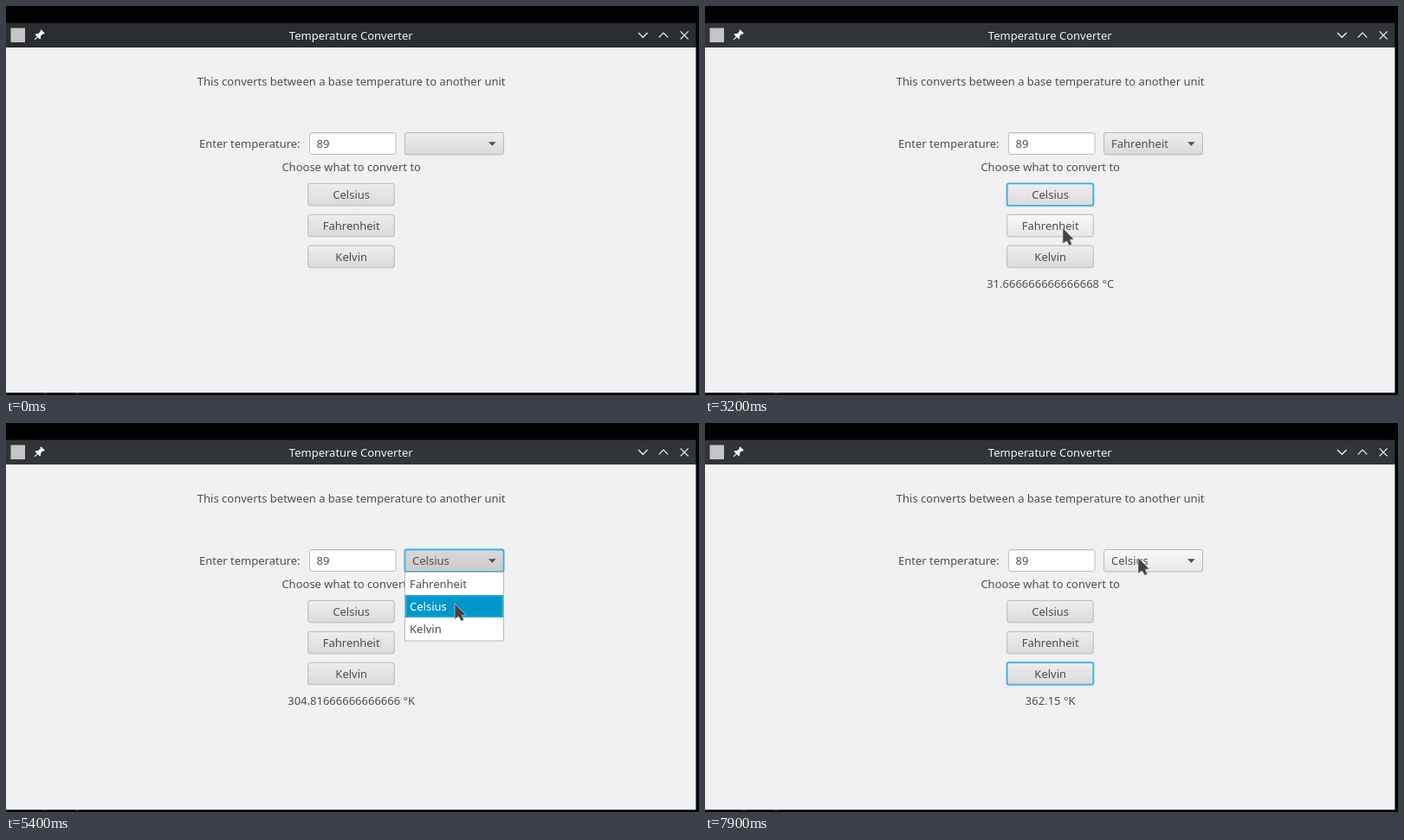
Animation of 800 by 450 pixels, one loop 8 s. Source, as an HTML page:

```html
<!DOCTYPE html>
<html lang="en">
<head>
<meta charset="utf-8">
<title>Temperature Converter</title>
<style>
  html, body { margin: 0; width: 100%; height: 100%; overflow: hidden; background: #000; }
  svg { display: block; width: 800px; height: 450px; }
  text { font: 13px "Noto Sans", "Open Sans", sans-serif; fill: #4e4e4f; white-space: pre; }
  .mid { text-anchor: middle; }
  .title { fill: #f0f1f2; }
  .glow { fill: none; stroke: #d3eaf5; stroke-width: 4; display: none; }
  .box { fill: url(#face); stroke: #b9b9b9; }
  .hover .box { fill: url(#lit); }
  .open .box { fill: url(#armed); }
  .focus .box { stroke: #47aedb; stroke-width: 1.8; }
  .focus .glow { display: block; }
  .row rect { fill: #fff; }
  .row .edge { fill: none; }
  .row.over rect { fill: #cce3f4; }
  .row.on rect { fill: #0096c9; }
  .row.on .edge { fill: none; stroke: #45b2da; }
  .row.on text { fill: #fff; }
</style>
</head>
<body>
<svg viewBox="0 0 800 450">
  <defs>
    <linearGradient id="face" x2="0" y2="1">
      <stop offset="0" stop-color="#eeeeef"/><stop offset="1" stop-color="#dadada"/>
    </linearGradient>
    <linearGradient id="lit" x2="0" y2="1">
      <stop offset="0" stop-color="#f8f8f9"/><stop offset="1" stop-color="#e8e8e9"/>
    </linearGradient>
    <linearGradient id="armed" x2="0" y2="1">
      <stop offset="0" stop-color="#d8d8d9"/><stop offset="1" stop-color="#cbcbcc"/>
    </linearGradient>
  </defs>

  <rect width="800" height="450" fill="#000"/>
  <rect y="47" width="796.4" height="400.4" fill="#f1f1f3"/>
  <path d="M43 447.8h4M80 447.8h4" stroke="#777"/>
  <rect id="bar" y="19.6" width="796.4" height="28.4"/>
  <rect x="5.5" y="25.5" width="16.5" height="16.5" fill="#c6c5c4"/>
  <g transform="translate(38 34) rotate(45)" fill="#fcfcfc">
    <path d="M-3-6.5h6v1.6h-1v4l2 2v1.4h-8v-1.4l2-2v-4h-1z"/>
    <path d="M-.6 2h1.2v5h-1.2z"/>
  </g>
  <path d="M730 31l5.3 5.3L740.6 31M753.7 36.4l5.3-5.3 5.3 5.3M778.6 29.4l9 9M787.6 29.4l-9 9"
        fill="none" stroke="#f0f1f2" stroke-width="1.3"/>
  <text class="mid title" x="398.3" y="38.5">Temperature Converter</text>

  <text class="mid" x="398.7" y="92">This converts between a base temperature to another unit</text>
  <text x="223" y="164">Enter temperature:</text>
  <rect x="350.5" y="146.5" width="99.5" height="25" rx="2.5" fill="#fff" stroke="#bebebf"/>
  <path d="M352 147.8h96.5" stroke="#e6e6e6"/>
  <text x="358.5" y="164">89</text>
  <text class="mid" x="398.7" y="191">Choose what to convert to</text>
  <g id="buttons"></g>
  <text id="result" class="mid" x="398.7" y="326"></text>
  <g id="popup">
    <rect x="460.5" y="172.5" width="114" height="79.5" fill="#fff" stroke="#b6b6b7"/>
  </g>
  <path id="cursor" d="M0 0V17.8L4.6 14.9 7.6 20.2 10.6 18.7 8.3 13.5 12.8 12.8Z"
        fill="#434346" stroke="#cfcfd1" stroke-width=".7" stroke-linejoin="round"/>
</svg>
<script>
const LOOP = 8000, STEP = 100, VALUE = 89;
const $ = id => document.getElementById(id);
const UNITS = ["Fahrenheit", "Celsius", "Kelvin"];

// Pointer moves: start, duration, goal x and y; it rests in between
const moves = [
  [300, 100, 640, 190], [400, 300, 556, 174], [900, 200, 550, 163], [1200, 300, 545, 190],
  [1600, 200, 542, 271], [1800, 400, 398, 212], [2700, 500, 413, 257], [3400, 300, 418, 285],
  [4100, 500, 482, 181], [4600, 200, 520, 164], [5000, 400, 518, 209], [5500, 400, 418, 219],
  [6500, 300, 430, 254], [6900, 100, 437, 287], [7500, 400, 500, 156]
];

// A press takes the focus, the release one step later acts
const clicks = [
  [1000, "combo"], [1500, "Fahrenheit", "row"],
  [2600, "Celsius"], [3300, "Fahrenheit"], [4000, "Kelvin"],
  [4900, "combo"], [5400, "Celsius", "row"],
  [6100, "Celsius"], [6800, "Fahrenheit"], [7200, "Kelvin"]
];

function convert(from, to) {
  const celsius = from === "Fahrenheit" ? (VALUE - 32) * 5 / 9 : VALUE;
  const n = from === to ? VALUE
    : to === "Fahrenheit" ? celsius * 9 / 5 + 32
    : to === "Kelvin" ? celsius + 273.15 : celsius;
  return `${Number.isInteger(n) ? n.toFixed(1) : n} °${to[0]}`;
}

function stateAt(t) {
  const s = { unit: "", focus: "", result: "", open: false };
  for (const [at, name, row] of clicks) {
    if (t < at) break;
    const released = t >= at + STEP;
    if (row) {
      s.unit = name;
      s.open = !released;
    } else {
      s.focus = name;
      if (released && name === "combo") s.open = true;
      else if (released) s.result = convert(s.unit, name);
    }
  }
  return s;
}

function pointerAt(t) {
  let x = 640, y = 190;
  if (t < moves[1][0]) return null;
  for (const [at, time, gx, gy] of moves) {
    const k = Math.min(1, Math.max(0, (t - at) / time));
    const ease = k * k * (3 - 2 * k);
    x += (gx - x) * ease;
    y += (gy - y) * ease;
  }
  return { x, y };
}

function add(parent, tag, attrs, text = "") {
  const el = document.createElementNS("http://www.w3.org/2000/svg", tag);
  for (const key in attrs) el.setAttribute(key, attrs[key]);
  el.textContent = text;
  return parent.appendChild(el);
}

function control(name, x, y, w, h = 25.5) {
  const g = add($("buttons"), "g", {});
  const shape = { x, y, width: w, height: h, rx: 2.5 };
  add(g, "rect", { ...shape, class: "glow" });
  add(g, "rect", { ...shape, class: "box" });
  return { name, g, x, y, w, h };
}

const combo = control("combo", 460.5, 146.5, 114);
const choice = add(combo.g, "text", { x: 469, y: 164 });
add(combo.g, "path", { d: "M557 157.2h8.6l-4.3 4.6z", fill: "#505050" });

const buttons = ["Celsius", "Fahrenheit", "Kelvin"].map((name, i) => {
  const b = control(name, 348.7, 205.4 + i * 35.9, 99.6);
  add(b.g, "text", { x: 398.7, y: b.y + 17.4, class: "mid" }, name);
  return b;
});
const controls = [combo, ...buttons];

const rows = UNITS.map((name, i) => {
  const x = 461, y = 173 + i * 26, w = 113, h = 26;
  const g = add($("popup"), "g", {});
  add(g, "rect", { x, y, width: w, height: h });
  add(g, "rect", { x: x + 1, y: y + 1, width: w - 2, height: h - 2, class: "edge" });
  add(g, "text", { x: 466, y: y + 18 }, name);
  return { name, g, x, y, w, h };
});

const inside = (p, r) =>
  !!p && p.x >= r.x && p.x <= r.x + r.w && p.y >= r.y && p.y <= r.y + r.h;

function draw(t) {
  const s = stateAt(t), p = pointerAt(t);
  $("bar").setAttribute("fill", s.focus ? "#313439" : "#2a2d32");
  $("result").textContent = s.result;
  choice.textContent = s.unit;
  for (const c of controls) {
    const look = [];
    if (c.name === s.focus) look.push("focus");
    if (!s.open && inside(p, c)) look.push("hover");
    if (s.open && c === combo) look.push("open");
    c.g.setAttribute("class", look.join(" "));
  }
  $("popup").style.display = s.open ? "" : "none";
  for (const r of rows) {
    r.g.setAttribute("class", "row " + (r.name === s.unit ? "on" : inside(p, r) ? "over" : ""));
  }
  $("cursor").style.display = p ? "" : "none";
  if (p) $("cursor").setAttribute("transform", `translate(${p.x} ${p.y})`);
}

const start = performance.now();
let last = -1;
function tick() {
  const t = Math.floor((performance.now() - start) % LOOP / STEP) * STEP;
  if (t !== last) draw(last = t);
  requestAnimationFrame(tick);
}
tick();
</script>
</body>
</html>
```
